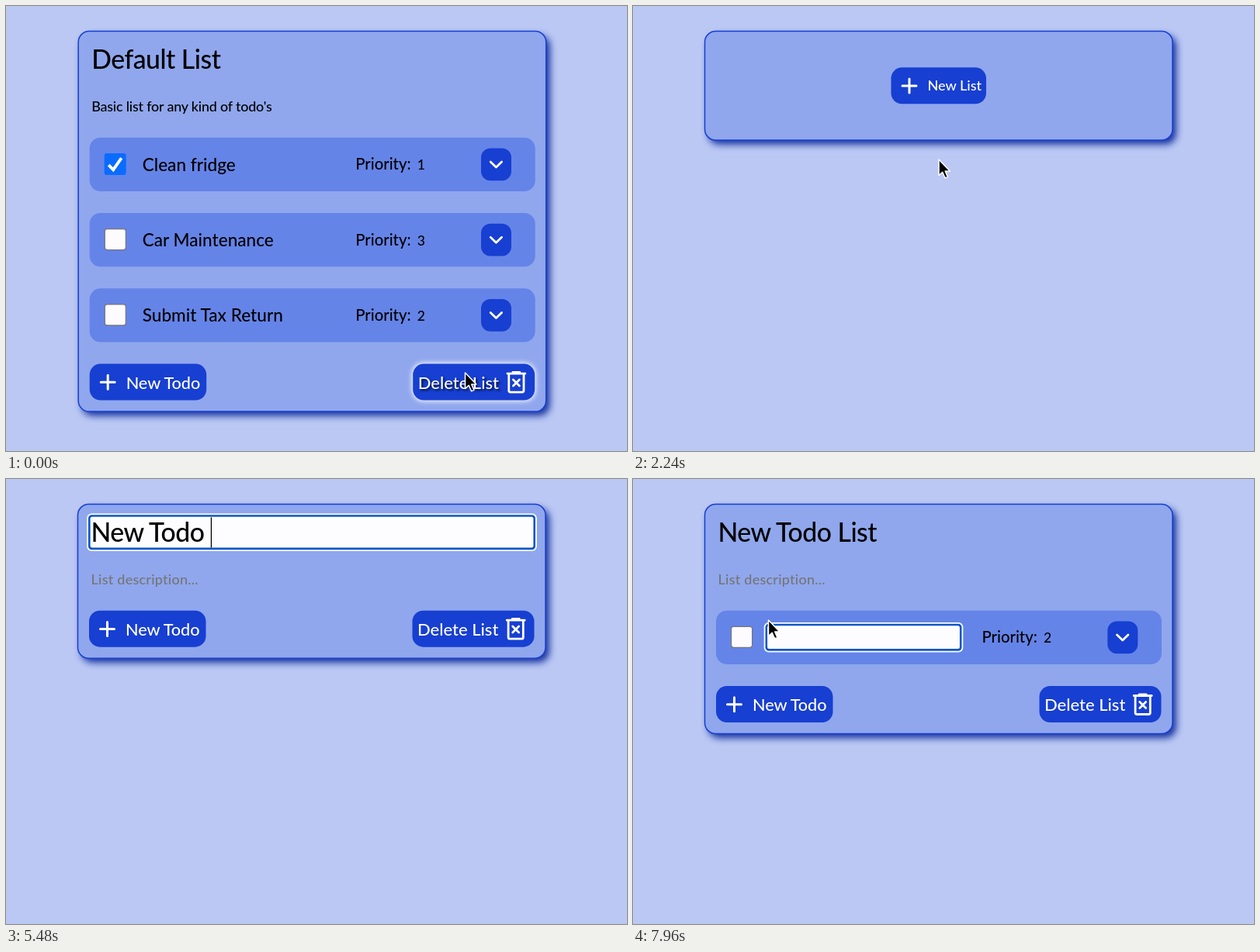
Animation of 800x574 px, one loop 8000 ms. Source, as an HTML page:

```html
<!DOCTYPE html>
<html lang="en">
<head>
<meta charset="utf-8">
<title>Todo lists</title>
<style>
  html, body { margin: 0; width: 100%; height: 100%; overflow: hidden; background: #bbc8f4; }
  svg { display: block; width: 100vw; height: 100vh; }
  text { font-family: Lato, "Open Sans", sans-serif; font-weight: 500; white-space: pre; }
  .hot { text-shadow: 2px 2px 3px rgba(0, 0, 0, .75); }
</style>
</head>
<body>
<svg id="stage" viewBox="0 0 800 574" xmlns="http://www.w3.org/2000/svg">
  <defs>
    <filter id="shade" x="-10%" y="-20%" width="120%" height="150%">
      <feGaussianBlur stdDeviation="5"/>
    </filter>
    <filter id="glow" x="-20%" y="-50%" width="140%" height="200%">
      <feGaussianBlur stdDeviation="3"/>
    </filter>
    <g id="plus" stroke="#fff" stroke-width="3" stroke-linecap="round">
      <path d="M-9 0H9M0 -9V9"/>
    </g>
    <g id="trash" fill="none" stroke="#fff" stroke-width="2.8" stroke-linecap="round" stroke-linejoin="round">
      <path d="M-11.5 -11.5H11.5M-4.5 -13.2H4.5M-9.6 -11V10.5Q-9.6 12.5 -7.6 12.5H7.6Q9.6 12.5 9.6 10.5V-11"/>
      <path d="M-4 -3.6L4 4.4M4 -3.6L-4 4.4"/>
    </g>
    <path id="arrow" d="M0 0V20.5L4.7 16.2L8 23.8L11.4 22.4L8.2 14.9H14.4Z"
      fill="#000" stroke="#fff" stroke-width="1.5" stroke-linejoin="round"/>
  </defs>
  <g id="page"></g>
  <g id="dialog"></g>
  <use id="pointer" href="#arrow"/>
</svg>
<script>
const LOOP = 8000;
const BLUE = '#173fd1', CARD = '#90a7ed', ROW = '#6584e8', GREY = '#757575';
const STEP = 97.3, TOP = 169.7;
const AT = { open: 200, remove: 1640, create: 2920, hide: 4400, show: 6480, add: 7300 };

const KEYS = [4400, 4540, 4700, 4840, 5000, 5130, 5260, 5370, 5480, 5680, 5840, 6000, 6160];
const NAME = 'New Todo List';

// time, x, y
const PATH = [
  [0, 591.5, 473], [480, 591.5, 473], [1240, 387, 300], [1740, 387, 300],
  [2240, 394, 198], [2640, 401, 96.5], [6480, 401, 96.5], [7080, 173, 184],
  [7300, 173, 184], [7500, 174.5, 182]
];

const TODOS = [
  { name: 'Clean fridge', rank: 1, done: true },
  { name: 'Car Maintenance', rank: 3 },
  { name: 'Submit Tax Return', rank: 2 }
];

const $ = id => document.getElementById(id);
const clamp = v => Math.max(0, Math.min(1, v));
const ramp = (t, from, length) => clamp((t - from) / length);
const ease = k => k * k * (3 - 2 * k);

const rect = (x, y, w, h, r, fill, extra = '') =>
  `<rect x="${x}" y="${y}" width="${w}" height="${h}" rx="${r}" fill="${fill}" ${extra}/>`;

const label = (x, y, size, str, fill = '#000', spacing = 0, extra = '') =>
  `<text x="${x}" y="${y}" font-size="${size}" fill="${fill}" letter-spacing="${spacing}" ${extra}>${str}</text>`;

const icon = (id, x, y) => `<use href="#${id}" x="${x}" y="${y}"/>`;

function pointerAt(t) {
  let i = PATH.length - 1;
  while (i > 0 && PATH[i][0] > t) i--;
  const a = PATH[i], b = PATH[i + 1] || a;
  const k = b === a ? 0 : ease(ramp(t, a[0], b[0] - a[0]));
  return [a[1] + (b[1] - a[1]) * k, a[2] + (b[2] - a[2]) * k];
}

function card(height) {
  return rect(97, 38, 603, height, 14, '#12319f', 'filter="url(#shade)"') +
    rect(92.5, 32.5, 602.5, height, 14, CARD, `stroke="${BLUE}" stroke-width="1.5"`);
}

function button(x, y, w, hover, content) {
  const halo = hover ? rect(x - 1, y - 1, w + 2, 49, 15, '#fff', 'filter="url(#glow)"') : '';
  return halo + rect(x, y, w, 47, 14, BLUE) + `<g${hover ? ' class="hot"' : ''}>${content}</g>`;
}

function field(x, y, w, h) {
  return rect(x - 1.8, y - 1.8, w + 3.6, h + 3.6, 6, '#fff') +
    rect(x, y, w, h, 4.5, '#0a56c6') +
    rect(x + 2.6, y + 2.6, w - 5.2, h - 5.2, 2.5, '#fdfcff');
}

function checkbox(y, done) {
  if (!done) return rect(126.6, y + 20.6, 27, 27, 3, '#fdfbfd', 'stroke="#74757c" stroke-width="1.2"');
  return rect(126, y + 20.3, 28, 28, 3, '#0a6cff') +
    `<path d="M131.5 ${y + 35.5}L137.5 ${y + 41.5}L148 ${y + 26.5}" fill="none" stroke="#fff" stroke-width="3.8"/>`;
}

function row(todo, i) {
  const y = TOP + STEP * i;
  return rect(107, y, 574, 69.3, 14, ROW) + checkbox(y, todo.done) +
    (todo.name ? label(175, y + 43, 22.6, todo.name) : field(170.5, y + 17, 253, 35)) +
    label(449.5, y + 41.5, 20.3, 'Priority:') + label(529, y + 41.5, 17.5, todo.rank) +
    rect(611.3, y + 13.8, 39, 41.7, 12, BLUE) +
    `<path d="M623.5 ${y + 31.3}L630.7 ${y + 38.3}L637.9 ${y + 31.3}" fill="none" stroke="#fff"
      stroke-width="2.8" stroke-linecap="round" stroke-linejoin="round"/>`;
}

function list({ title, about, todos, editing, hot }) {
  const y = TOP + STEP * todos.length;
  const hint = editing && !title;
  return card(y + 29) +
    (editing ? field(106, 46.2, 576, 45) : '') +
    label(109.5, 81, 33.8, hint ? 'List title' : title, hint ? '#767676' : '#000', -.5, 'id="title"') +
    (about ? label(109.5, 136.3, 17.9, about, '#000', -.18)
           : label(109.5, 136.3, 18, 'List description...', GREY, .25)) +
    todos.map(row).join('') +
    button(107, y, 150.5, hot === 'add',
      icon('plus', 130.5, y + 23.7) + label(154, y + 32, 21.7, 'New Todo', '#fff', -.1)) +
    button(523.5, y, 157, hot === 'delete',
      label(530, y + 32, 22, 'Delete List', '#fff') + icon('trash', 656.7, y + 24));
}

function emptyCard(hot) {
  return card(140.5) + button(332.5, 79.3, 122.5, hot,
    icon('plus', 356, 103) + label(379.5, 109.3, 18.1, 'New List', '#fff'));
}

function dialog() {
  return rect(0, 0, 800, 574, 0, '#000', 'opacity=".54"') +
    rect(4, 140.3, 778, 220.4, 14, CARD) +
    '<path d="M728.5 176.5L745.5 193.5M745.5 176.5L728.5 193.5" stroke="#183bbb" stroke-width="3.2"/>' +
    label(148.5, 241, 21, 'Are you sure you want to permanently delete this list?') +
    button(312.3, 286, 161.2, false,
      icon('trash', 336, 310) + label(352.5, 316, 17.1, 'Delete Forever', '#fff'));
}

// Focus caret: half a second on, half a second off, restarted by each key.
function caret(t) {
  const last = [AT.create, ...KEYS].filter(k => k <= t).pop();
  return (t - last) % 1000 < 500;
}

function pageAt(t, x, y) {
  if (t < AT.remove) {
    return list({
      title: 'Default List', about: "Basic list for any kind of todo's", todos: TODOS,
      hot: t < AT.open + 60 ? 'delete' : ''
    });
  }
  if (t < AT.create) return emptyCard(x > 332 && x < 455 && y > 79 && y < 126);
  const title = NAME.slice(0, KEYS.filter(k => k <= t).length);
  if (t >= AT.add) return list({ title, todos: [{ rank: 2 }] });
  const over = x > 107 && x < 257 && y > TOP && y < TOP + 47;
  return list({ title, todos: [], editing: true, hot: over ? 'add' : '' });
}

let shown = '';
function render(t) {
  const [x, y] = pointerAt(t);
  const html = pageAt(t, x, y);
  const page = $('page');
  if (html !== shown) page.innerHTML = shown = html;
  page.setAttribute('transform', `translate(${t < AT.open ? .7 : 0} 0)`);

  let bar = $('caret');
  if (t >= AT.create && t < AT.add) {
    if (!bar) {
      page.insertAdjacentHTML('beforeend', rect(110, 49.5, 1.3, 39, 0, '#000', 'id="caret"'));
      bar = $('caret');
    }
    const typed = t >= KEYS[0];
    bar.setAttribute('x', 109.8 + (typed ? $('title').getComputedTextLength() : 0));
    bar.setAttribute('visibility', caret(t) ? 'visible' : 'hidden');
  }

  const fade = t < AT.remove ? ease(ramp(t, AT.open, 200)) : 0;
  $('dialog').setAttribute('opacity', fade);
  $('pointer').setAttribute('transform', `translate(${x} ${y})`);
  $('pointer').setAttribute('visibility', t >= AT.hide && t < AT.show ? 'hidden' : 'visible');
}

$('dialog').innerHTML = dialog();
const start = performance.now();
function tick() {
  render((performance.now() - start) % LOOP);
  requestAnimationFrame(tick);
}
tick();
</script>
</body>
</html>
```
